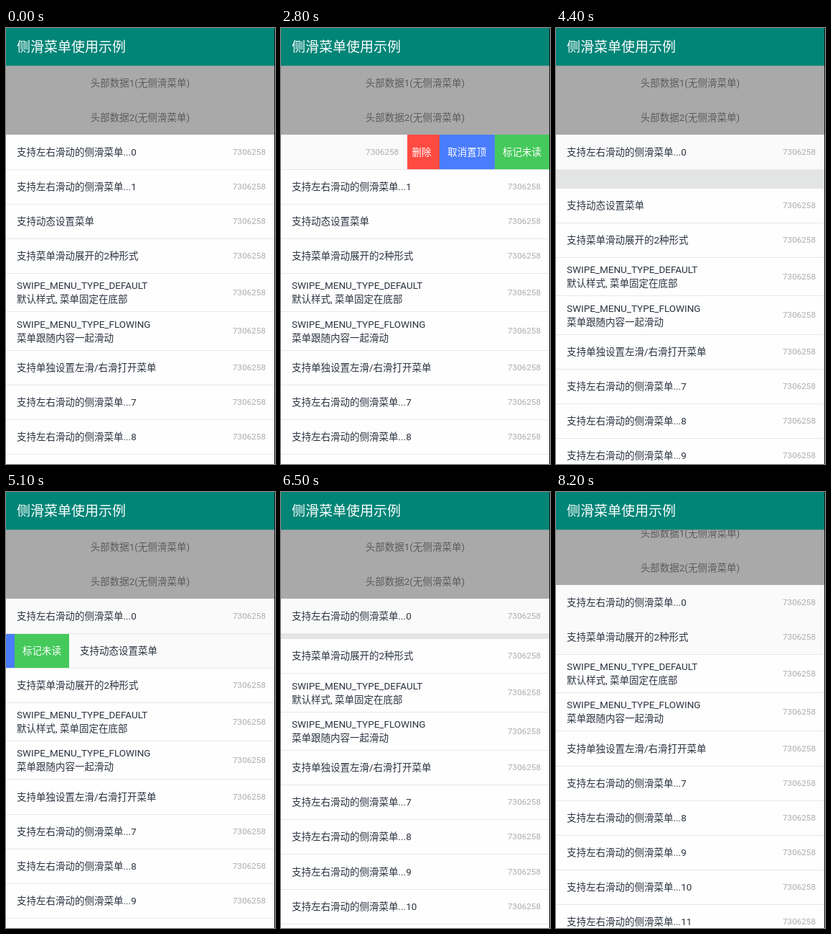
An HTML page that plays this animation: 375 px wide and 605 px high, repeating every 8.8 s.

```html
<!DOCTYPE html>
<html lang="zh-CN">
<head>
<meta charset="utf-8">
<title>侧滑菜单使用示例</title>
<style>
  html, body { margin: 0; width: 100%; height: 100%; overflow: hidden; }
  body { position: relative; background: #fefefe; font: 13.5px/19px Roboto, "Noto Sans CJK SC", "Noto Sans CJK", sans-serif; }
  #stage { position: absolute; left: 0; top: 0; width: 375px; height: 605px; overflow: hidden; background: #111; }
  #bar { position: absolute; width: 374px; height: 52px; border-bottom: 1px solid #6a9a94; background: #008577; color: #fff; font-size: 19px; line-height: 54px; text-indent: 15px; }
  #list { position: absolute; top: 52px; width: 374px; height: 553px; overflow: hidden; background: #e3e4e4; }
  .head { position: absolute; width: 374px; height: 49px; line-height: 49px; background: #a9a9a9; color: #5c5c5c; text-align: center; }
  .row { position: absolute; width: 374px; box-sizing: border-box; overflow: hidden; background: #fefefe; border-bottom: 1px solid #e8e8e8; }
  .face { position: absolute; inset: 0; display: flex; align-items: center; justify-content: space-between; padding: 0 12px 0 15px; background: #fefefe; color: #2c3440; white-space: pre; }
  .face.used { background: #fafafa; }
  .face small { font-size: 11.7px; color: #adadaf; }
  .menu { position: absolute; top: 0; bottom: 0; width: max-content; display: flex; color: #fff; white-space: nowrap; }
  .menu span { position: relative; overflow: hidden; display: flex; align-items: center; padding: 0 11.4px; }
  .menu span:nth-child(1) { background: #ff4b42; }
  .menu span:nth-child(2) { background: #4a7dfe; }
  .menu span:nth-child(3) { background: #45c95b; }
  .menu i { position: absolute; left: 50%; top: 50%; width: 56px; height: 56px; margin: -28px; border-radius: 50%; background: rgba(0, 0, 0, .12); }
</style>
</head>
<body>
<div id="stage">
  <div id="list"></div>
  <div id="bar">侧滑菜单使用示例</div>
</div>
<script>
const LOOP = 8800, STEP = 100, WIDTH = 374;
const SINGLE = 48.1, DOUBLE = 53.4, HEAD = 96.4;
const list = document.getElementById('list');

const special = {
  2: '支持动态设置菜单',
  3: '支持菜单滑动展开的2种形式',
  4: 'SWIPE_MENU_TYPE_DEFAULT\n默认样式, 菜单固定在底部',
  5: 'SWIPE_MENU_TYPE_FLOWING\n菜单跟随内容一起滑动',
  6: '支持单独设置左滑/右滑打开菜单'
};

const ramp = (t, start, end) => Math.min(1, Math.max(0, (t - start) / (end - start)));
const settle = p => Math.sin(p * Math.PI / 2);
const pull = p => p ** 1.55;
const smooth = p => (1 - Math.cos(p * Math.PI)) / 2;

// Each move is [start, end, target, easing]; it begins where the last one stopped.
const glide = (moves, t) => moves.reduce(
  (v, [start, end, to, ease = settle]) => v + (to - v) * ease(ramp(t, start, end)), 0);

// Targets: 1 opens the left menu, -1 the right one, 0 closes.
const swipes = [
  { moves: [[500, 1000, 1], [1300, 1900, 0, pull], [2200, 2900, -1], [3000, 3300, 0]] },
  { moves: [[3200, 3600, -1]], drop: 4100 },
  { moves: [[4900, 5600, 1]], drop: 6100, flow: true },
  { moves: [[6900, 7500, -1, pull], [7600, 7900, 0]], flow: true, pin: '已置顶' }
];
const scroll = [[7600, 7900, 13], [8000, 8200, 19]];

function add(parent, tag, name, text = '') {
  const el = document.createElement(tag);
  el.className = name;
  el.textContent = text;
  return parent.appendChild(el);
}

const heads = [1, 2].map(n => add(list, 'div', 'head', `头部数据${n}(无侧滑菜单)`));

const rows = [];
for (let i = 0, y = HEAD; i < 15; i++) {
  const text = special[i] || `支持左右滑动的侧滑菜单...${i}`;
  const height = text.includes('\n') ? DOUBLE : SINGLE;
  const el = add(list, 'div', 'row');
  const row = { el, y, height, swipe: swipes[i] };
  if (row.swipe) {
    row.menu = add(el, 'div', 'menu');
    for (const name of ['删除', row.swipe.pin || '取消置顶', '标记未读']) add(row.menu, 'span', '', name);
    row.ripple = add(row.menu.firstChild, 'i', '');
  }
  row.face = add(el, 'div', 'face');
  add(row.face, 'span', '', text);
  add(row.face, 'small', '', '7306258');
  rows.push(row);
  y += height;
}

function drawSwipe({ el, face, menu, ripple, swipe }, t) {
  const { moves, flow, drop = Infinity } = swipe;
  const w = menu.offsetWidth, x = w * glide(moves, t);
  face.style.transform = `translateX(${x}px)`;
  face.classList.toggle('used', t > moves[0][0]);
  menu.style.visibility = x ? 'visible' : 'hidden';
  menu.style.left = (x > 0 ? (flow ? x - w : 0) : WIDTH + (flow ? x : -w)) + 'px';
  ripple.style.transform = `scale(${ramp(t - drop, 0, 100)})`;
  el.style.opacity = 1 - ramp(t - drop, 100, 250);
}

function draw(t) {
  const top = glide(scroll, t);
  heads.forEach((el, i) => el.style.top = Math.round(48 * i - top) + 'px');
  let shift = 0;
  for (const row of rows) {
    const y = row.y - top - shift, start = Math.round(y);
    row.el.style.top = start + 'px';
    row.el.style.height = Math.round(y + row.height) - start + 'px';
    if (!row.swipe) continue;
    drawSwipe(row, t);
    // Rows below close the gap once the deleted row has gone.
    if (row.swipe.drop) shift += SINGLE * smooth(ramp(t - row.swipe.drop, 120, 500));
  }
}

const begin = performance.now();
function tick() {
  const t = (performance.now() - begin) % LOOP;
  draw(Math.floor(t / STEP) * STEP);
  requestAnimationFrame(tick);
}
tick();
</script>
</body>
</html>
```
